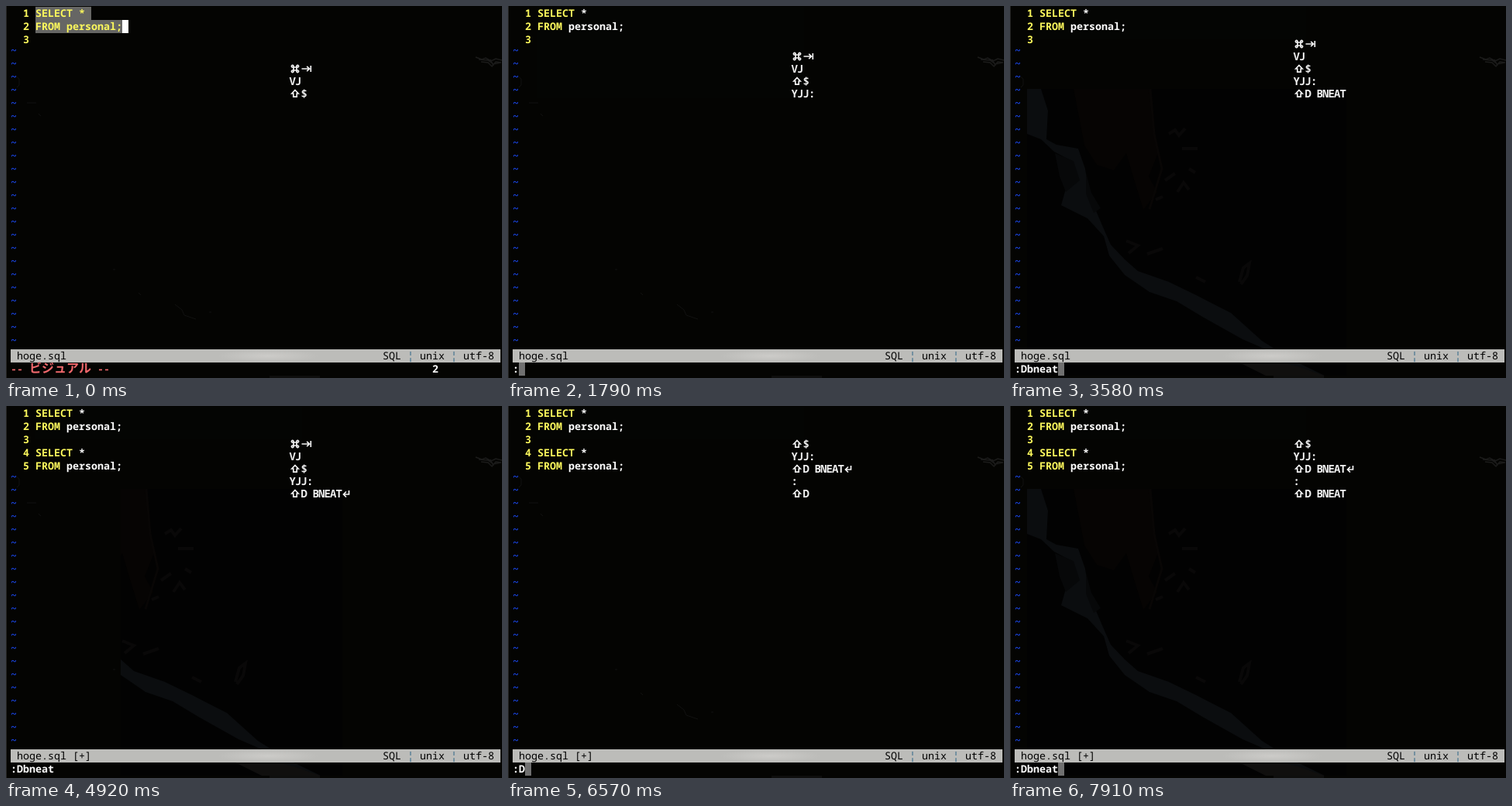
Write an HTML page that moves like this. It is 640 px wide and 480 px high and loops after 8 s.

```html
<!DOCTYPE html>
<html lang="ja">
<head>
<meta charset="utf-8">
<title>Editor session</title>
<style>
  html, body { margin: 0; width: 100%; height: 100%; overflow: hidden; background: #000; }
  svg { display: block; width: 640px; height: 480px; }
  text {
    font: 600 13.333px "Noto Sans Mono", "DejaVu Sans Mono", monospace;
    white-space: pre; text-rendering: geometricPrecision; fill: #fff;
  }
  .cjk { font: 700 16px "Noto Sans Mono CJK JP", "Noto Sans CJK JP", "Noto Sans CJK", sans-serif; }
  .keyword { fill: #fcf85c; }
  .tilde { fill: #1a46e4; font-weight: 800; }
  .status { fill: #000; font-weight: 500; }
  .divider { fill: #2a6488; font-weight: 500; }
  .mode { fill: #f0686c; }
  .dark { fill: #171700; }
  .key { font-size: 14px; font-weight: 700; fill: #f2f2f2; text-anchor: middle; }
  .glyph { fill: none; stroke: #f2f2f2; stroke-width: 1.7; }
</style>
</head>
<body>
<svg viewBox="0 0 640 480">
  <defs>
    <clipPath id="reveal"><rect id="window" x="22" y="107" width="412" height="370"/></clipPath>
    <radialGradient id="glow">
      <stop offset="0" stop-color="#cccbc8"/>
      <stop offset="1" stop-color="#bcbcb9"/>
    </radialGradient>
  </defs>

  <rect width="640" height="480" fill="#040402"/>
  <rect id="tint" x="38" y="1" width="344" fill="#040503"/>
  <path d="M.5 0V480" stroke="#262626"/>
  <g fill="none" stroke="#1b1b1a">
    <path d="M606 66l8 3 5-2 7 4 6-3 8 2M613 72l9 1 5 5 5-6 7 1M610 69l12 1 7 5 9-2M625 69l4 8" stroke-width="1.5"/>
    <path d="M12 90l5 4v8l-3 3M27 125h12M42 139l3 3M138 340h3M171 370l3 3M218 385l9 7 3 7 15 5M262 395h3" stroke="#111110"/>
    <path d="M340 478.5H405" stroke="#0e0e0d" stroke-width="3"/>
  </g>

  <g id="wallpaper" clip-path="url(#reveal)">
    <rect x="22" y="107" width="412" height="370" fill="#020202"/>
    <path d="M82 107H181L186 160 191 190 179 220 190 240 172 263 160 224 150 190 134 212 112 205 96 180Z" fill="#060403"/>
    <path d="M181 107L186 165 196 210 180 262" fill="none" stroke="#080605" stroke-width="3"/>
    <path d="M22 107H40L49 135 47 172 60 179 88 184 97 210 101 236 110 262 122 290 130 308 148 327 165 342 205 356 240 373 285 396 325 432 365 457 406 477H340L330 443 300 430 250 402 215 381 180 369 148 347 128 322 121 297 100 274 66 257 73 232 88 226 78 199 57 188 40 172 22 165Z" fill="#0b0d0f"/>
    <path d="M58 190l24 10 8 25-18 15-8-20zM98 215l7 26 12 20-9 6-10-25z" fill="#070809"/>
    <path d="M205 165l8-5 5 7 8-9M222 184h20M231 210l8 5M200 225l13-9M216 240l8-12 7 9M188 250l9-4M150 303l15 6-12 10M177 320l20-7M240 350l12 6M296 356l5-18 8-6-3 16-8 11" fill="none" stroke="#090808" stroke-width="4"/>
    <path d="M270 447l35-5 28 14 38 9 34 12H330Z" fill="#100f0e"/>
  </g>

  <rect x="6" y="443" width="632" height="17" fill="#bcbcb9"/>
  <ellipse cx="338" cy="451.5" rx="65" ry="8.5" fill="url(#glow)"/>
  <g id="screen"></g>
</svg>

<script>
const COL = 8, ROW = 17, LEFT = 6, TEXT_X = 38, LAST_ROW = 26;
const KEY_X = 366, KEY_W = 7.5, KEY_H = 16, KEY_BASE = 118, KEY_ROWS = 5;
const LOOP = 8000;

const statements = [["SELECT", " *"], ["FROM", " personal;"], ["", ""], ["SELECT", " *"], ["FROM", " personal;"]];
const glyphs = {
  "⌘": "M5-2H9V2H5ZM5-2H3.8A1.3 1.3 0 1 1 5-3.2ZM9-2V-3.2A1.3 1.3 0 1 1 10.2-2ZM9 2H10.2A1.3 1.3 0 1 1 9 3.2ZM5 2V3.2A1.3 1.3 0 1 1 3.8 2Z",
  "⇥": "M.5 0H10.5M7.2-3.2L10.5 0 7.2 3.2M12.3-4V4",
  "⇧": "M7-4.5L11.2 0H9.2V4.2H4.8V0H2.8Z",
  "↵": "M9-4V1H2M5.5-2.5L2 1 5.5 4.5"
};

const steps = [
  { t: 0, press: "⌘⇥|VJ|⇧$", message: "visual", rows: 3, tint: 0 },
  { t: 600, press: "|Y", message: "yank", cursor: 0 },
  { t: 1050, press: "J", cursor: 1, tint: 118 },
  { t: 1190, press: "J", cursor: 2 },
  { t: 1640, press: ":", cursor: null },
  { t: 1790, message: "", command: ":", caret: true },
  { t: 2090, press: "|⇧D", command: ":D", tint: 42 },
  { t: 2390, press: " B", command: ":Db", reveal: 22 },
  { t: 2680, press: "N", command: ":Dbn" },
  { t: 2830, press: "E", command: ":Dbne" },
  { t: 3280, press: "A", command: ":Dbnea" },
  { t: 3430, press: "T" },
  { t: 3580, command: ":Dbneat" },
  { t: 4320, press: "↵", caret: false },
  { t: 4470, rows: 5, cursor: 2, reveal: 148 },
  { t: 4920, cursor: null },
  { t: 5520, press: "|:", command: ":", caret: true, reveal: null },
  { t: 6570, press: "|⇧D", command: ":D" },
  { t: 6860, press: " B", command: ":Db", reveal: 22 },
  { t: 7160, press: "N", command: ":Dbn" },
  { t: 7610, press: "E", command: ":Dbne" },
  { t: 7760, press: "A", command: ":Dbnea" },
  { t: 7910, press: "T", command: ":Dbneat" }
];

// Each state carries everything accumulated so far.
const states = [];
steps.reduce((previous, step) => {
  const state = { ...previous, ...step, keys: previous.keys + (step.press || "") };
  states.push(state);
  return state;
}, { keys: "", command: "", cursor: null, reveal: null });

const byId = id => document.getElementById(id);
const screen = byId("screen");

function add(tag, attributes, content = "") {
  const node = document.createElementNS("http://www.w3.org/2000/svg", tag);
  for (const name in attributes) node.setAttribute(name, attributes[name]);
  node.textContent = content;
  screen.append(node);
}
const write = (x, y, content, style = "") => add("text", { x, y, class: style }, content);
const block = (x, row, columns, fill) =>
  add("rect", { x, y: 1 + row * ROW, width: columns * COL, height: ROW, fill });
const baseline = row => 14 + row * ROW;

function drawBuffer({ rows, message, cursor }) {
  const visual = message === "visual";
  if (visual) {
    block(TEXT_X, 0, 9, "#666664");
    block(TEXT_X, 1, 14, "#666664");
    block(TEXT_X + 14 * COL, 1, 1, "#fff");
  }
  statements.slice(0, rows).forEach(([keyword, rest], row) => {
    const y = baseline(row);
    write(22, y, row + 1, "keyword");
    write(TEXT_X, y, keyword, "keyword");
    write(TEXT_X + keyword.length * COL, y, rest, visual ? "keyword" : "");
  });
  for (let row = rows; row < LAST_ROW; row++) write(LEFT, baseline(row) - 3, "~", "tilde");
  if (cursor !== null) {
    const letter = statements[cursor][0].charAt(0);
    block(TEXT_X, cursor, 1, letter ? "#fcf85c" : "#fff");
    write(TEXT_X, baseline(cursor), letter, "dark");
  }
}

function drawStatus({ rows, message, command, caret }) {
  const y = baseline(26), bottom = baseline(27);
  write(14, y, "hoge.sql" + (rows > 3 ? " [+]" : ""), "status");
  write(486, y, "SQL   unix   utf-8", "status");
  write(518, y, "¦", "divider");
  write(574, y, "¦", "divider");
  if (message === "visual") {
    write(LEFT, bottom, "--", "mode");
    write(30, bottom, "ビジュアル", "cjk mode");
    write(118, bottom, "--", "mode");
    write(550, bottom, "2");
  } else if (message === "yank") {
    write(LEFT, bottom, "3");
    write(22, bottom, "行がヤンクされました", "cjk");
  }
  write(LEFT, bottom, command);
  if (caret) block(LEFT + command.length * COL, 27, 1, "#707070");
}

function drawKeys({ keys }) {
  const lines = keys.split("|").slice(-KEY_ROWS);
  lines.forEach((line, index) => {
    const y = KEY_BASE - (lines.length - 1 - index) * KEY_H;
    let x = KEY_X;
    for (const key of line) {
      const path = glyphs[key];
      if (path) add("path", { d: path, class: "glyph", transform: `translate(${x} ${y - 5})` });
      else write(x + KEY_W / 2, y, key, "key");
      x += path ? 2 * KEY_W : KEY_W;
    }
  });
}

function render(state) {
  screen.replaceChildren();
  byId("tint").setAttribute("height", state.tint);
  byId("wallpaper").setAttribute("visibility", state.reveal === null ? "hidden" : "visible");
  byId("window").setAttribute("x", state.reveal ?? 22);
  drawBuffer(state);
  drawStatus(state);
  drawKeys(state);
}

const start = performance.now();
let shown;
function tick() {
  const time = (performance.now() - start) % LOOP;
  const state = states.findLast(({ t }) => t <= time);
  if (state !== shown) render(shown = state);
  requestAnimationFrame(tick);
}
tick();
</script>
</body>
</html>
```
